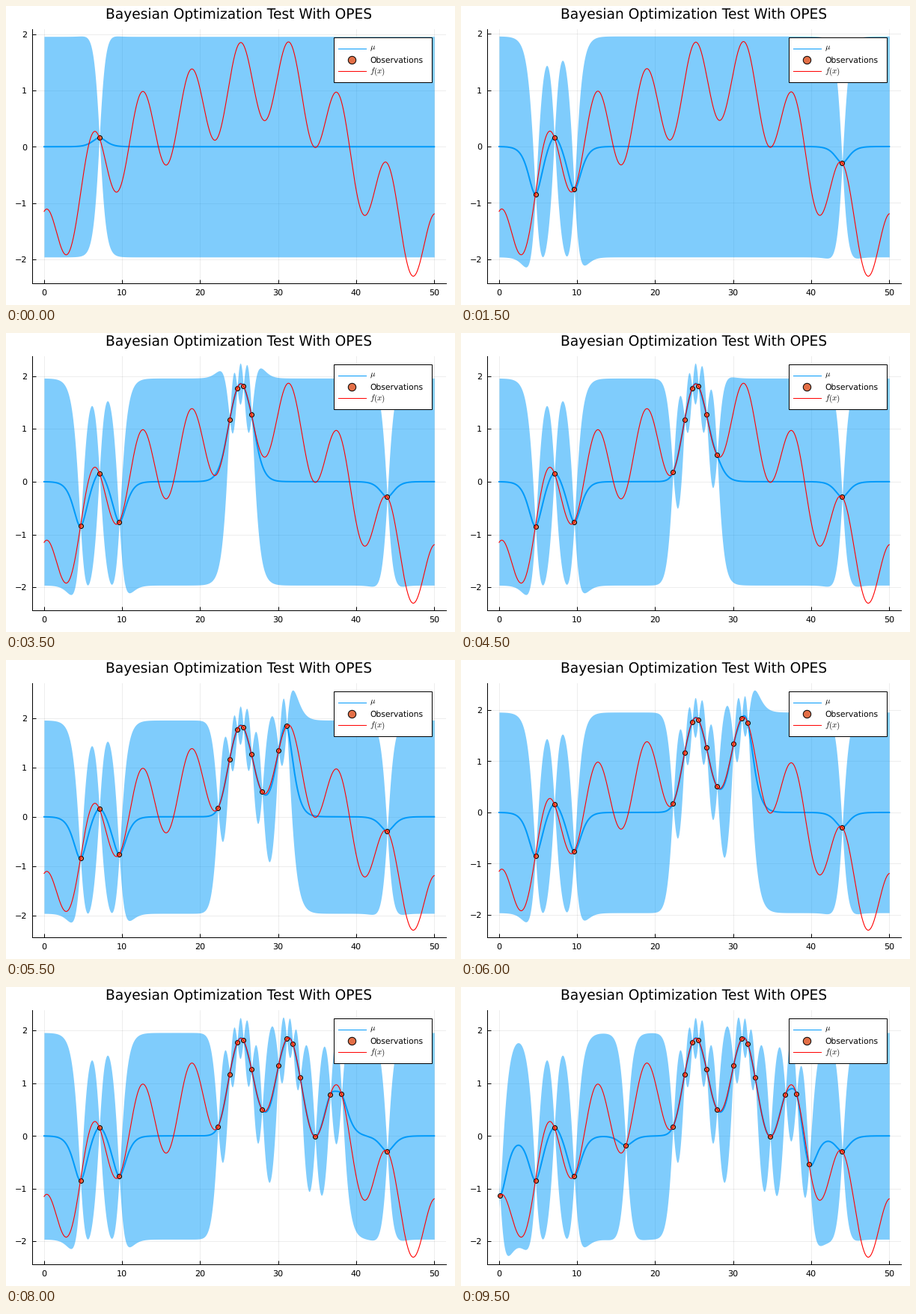
A matplotlib script that plays this animation: 600x400 px, repeating every 10000 ms.

```python
import matplotlib.pyplot as plt
import numpy as np
from matplotlib.animation import FuncAnimation
from matplotlib.patches import Rectangle

W, H, DPI = 600, 400, 100
PX = 72 / DPI  # points per pixel
BLUE, ORANGE, RED = "#009AFA", "#E36F47", "#FF0000"
LEFT, RIGHT, TOP, BOTTOM = 35.3, 587.9, 30.6, 371.1
LABEL = 11.1 * PX

plt.rcParams.update({"font.family": "DejaVu Sans", "mathtext.fontset": "cm",
                     "text.hinting": "no_hinting"})


def objective(x):
    return (0.75 * np.cos(x) + 0.25 * np.sin(x / 4)
            + 3 * np.sin(2 * np.pi * x / 100) - 1.9)


def matern52(a, b):
    s = np.sqrt(5) * np.abs(a[:, None] - b[None, :])
    return (1 + s + s**2 / 3) * np.exp(-s)


def posterior(x, seen):
    """Mean and 95% half-width of a unit Gaussian process given the samples."""
    gram = matern52(seen, seen) + 1e-8 * np.eye(len(seen))
    cross = matern52(x, seen)
    weights = np.linalg.solve(gram, cross.T)
    mean = weights.T @ objective(seen)
    var = 1 - np.sum(cross.T * weights, axis=0)
    return mean, 1.96 * np.sqrt(np.maximum(var, 0))


# Sample locations in the order the optimizer visits them
SAMPLES = np.array([7.08, 4.66, 9.63, 43.97, 26.58, 25.53, 24.74, 23.78,
                    27.93, 22.29, 31.09, 30.05, 31.86, 38.13, 36.69, 32.82,
                    34.74, 39.72, 16.25, 0.1])
xs = np.linspace(0, 50, 1001)
fx = objective(xs)

fig = plt.figure(figsize=(W / DPI, H / DPI), dpi=DPI, facecolor="white")
ax = fig.add_axes([LEFT / W, 1 - BOTTOM / H,
                   (RIGHT - LEFT) / W, (BOTTOM - TOP) / H])
ax.set_xlim(-1.5, 51.5)
ax.set_xticks(range(0, 51, 10))
ax.set_yticks(range(-2, 3))
ax.set_axisbelow(True)
ax.grid(color="black", alpha=0.1, linewidth=0.7 * PX)
ax.spines[["top", "right"]].set_visible(False)
ax.spines[["left", "bottom"]].set_linewidth(PX)
ax.tick_params(direction="in", length=5 * PX, width=PX, labelsize=LABEL)
ax.tick_params(axis="x", pad=7 * PX)
ax.tick_params(axis="y", pad=7.2 * PX)

band = ax.fill_between(xs, fx, fx, color=BLUE, alpha=0.5, linewidth=0, zorder=2)
mean_line, = ax.plot([], [], color=BLUE, linewidth=2 * PX, zorder=3)
dots, = ax.plot([], [], "o", color=ORANGE, markersize=6 * PX,
                markeredgecolor="black", markeredgewidth=PX, zorder=4)
ax.plot(xs, fx, color=RED, linewidth=1.1 * PX, zorder=5)

# Overlay in pixel coordinates for the title and the legend
page = fig.add_axes([0, 0, 1, 1])
page.set_xlim(0, W)
page.set_ylim(H, 0)
page.axis("off")
page.text(311.3, 17.5, "Bayesian Optimization Test With OPES",
          fontsize=18.7 * PX, ha="center", va="baseline")
page.add_patch(Rectangle((437.8, 41.8), 131.6, 60.3, facecolor="white",
                         edgecolor="black", linewidth=PX))
for y, color in ((56.6, BLUE), (86.6, RED)):
    page.plot([444, 481], [y, y], color=color, linewidth=PX)
page.plot(462.3, 71.8, "o", color=ORANGE, markersize=10.4 * PX,
          markeredgecolor="black", markeredgewidth=PX)
for y, label, size in ((58.7, r"$\mu$", 11), (76, "Observations", 10.75),
                       (90.2, "$f(x)$", 11)):
    page.text(486.4, y, label, fontsize=size * PX, va="baseline")


def update(step):
    seen = SAMPLES[:step + 1]
    mean, half = posterior(xs, seen)
    low, high = mean - half, mean + half
    outline = np.concatenate([np.column_stack([xs, high]),
                              np.column_stack([xs, low])[::-1]])
    band.set_verts([outline])
    mean_line.set_data(xs, mean)
    dots.set_data(seen, objective(seen))
    bottom, top = min(fx.min(), low.min()), max(fx.max(), high.max())
    margin = 0.03 * (top - bottom)
    ax.set_ylim(bottom - margin, top + margin)
    return band, mean_line, dots


anim = FuncAnimation(fig, update, frames=len(SAMPLES), interval=500,
                     repeat=True, repeat_delay=0, blit=False)
plt.show()
```
